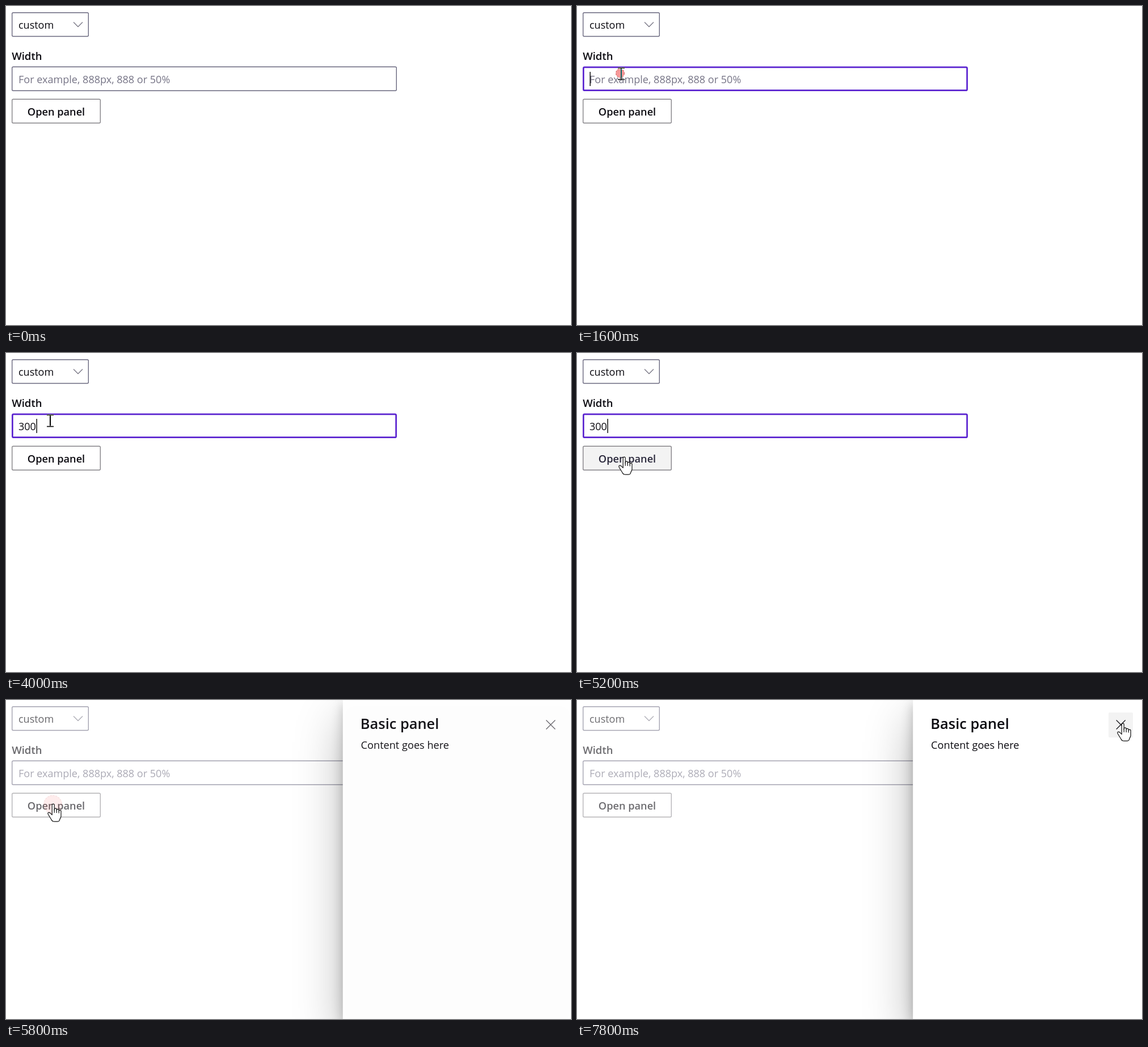
An HTML page with a canvas that plays this animation: 996x562 px, repeating every 8000 ms.

```html
<!DOCTYPE html>
<html lang="en">
<head>
<meta charset="utf-8">
<title>Panel with custom width</title>
<style>
  html, body { margin: 0; width: 100%; height: 100%; overflow: hidden; background: #fff; }
  canvas { display: block; width: 996px; height: 562px; }
</style>
</head>
<body>
<canvas id="stage" width="996" height="562"></canvas>
<script>
const ctx = document.getElementById('stage').getContext('2d');
const W = 996, H = 562, LOOP = 8000, STEP = 200;
const FONT = '"Open Sans", "Noto Sans", sans-serif';
const INK = '#0b0a10', BORDER = '#69677e', HINT = '#767486', ACCENT = '#5b24d0';

const INPUT = { x: 10, y: 106.5, w: 679, h: 43.5 };
const BUTTON = { x: 10, y: 163.5, w: 157, h: 43.5 };
const CLOSE = { x: 937, y: 22, w: 43, h: 44 };
const PANEL_X = 592.3, OPEN_AT = 5630, BLUR_AT = 5600;

const ARROW = new Path2D('M0 0V22.5l5-4.8 3.6 8 3.6-1.6-3.5-7.8h7z');
const HAND = new Path2D('M-.8 2.2a2 2 0 0 1 4 0V11v-1.5a2 2 0 0 1 4 .6v1a2 2 0 0 1 4 .6v1' +
  'a1.9 1.9 0 0 1 3.8 .6v8.5c0 2.5-2.5 4.5-2.5 6.8q-1 2.6-4 2.6h-5q-4 0-5.5-3.5' +
  'l-5.5-9q-1.5-3 .5-3.6 2-.4 4 2l2.2 2.2z');
const KNUCKLES = new Path2D('M3.2 9.5v6.2M7.2 11v5M11.2 12.5v4');

// Pointer path: time, x, y
const PATH = [
  [600, 200, 384], [800, 118, 222], [1000, 94.7, 154], [1200, 86, 134], [1400, 78, 119.5],
  [4800, 78, 119.5], [5000, 82, 157], [5200, 82, 183]
];
const CLICKS = [
  { at: 1600, x: 76, y: 118.5 },
  { at: 5557, x: 82.5, y: 184 }
];
const KEYS = [[3400, '3'], [3800, '30'], [4000, '300'], [5800, '']];

const inside = (p, r) => p.x >= r.x && p.x <= r.x + r.w && p.y >= r.y && p.y <= r.y + r.h;

function text(str, x, y, size, color, weight = 400, align = 'left') {
  ctx.font = `${weight} ${size}px ${FONT}`;
  ctx.fillStyle = color;
  ctx.textAlign = align;
  ctx.fillText(str, x, y);
}

function box(r, line, color, fill) {
  ctx.beginPath();
  ctx.roundRect(r.x + line / 2, r.y + line / 2, r.w - line, r.h - line, 2);
  ctx.fillStyle = fill || '#fff';
  ctx.fill();
  ctx.strokeStyle = color;
  ctx.lineWidth = line;
  ctx.stroke();
}

function stroke(color, width, ...lines) {
  ctx.strokeStyle = color;
  ctx.lineWidth = width;
  ctx.beginPath();
  for (const line of lines) {
    line.forEach(([x, y], i) => i ? ctx.lineTo(x, y) : ctx.moveTo(x, y));
  }
  ctx.stroke();
}

function pointer(t) {
  const last = PATH[PATH.length - 1];
  if (t >= last[0]) {
    const k = Math.min(1, Math.max(0, (t - 6900) / 900));
    const e = k * k * (3 - 2 * k);
    return { x: last[1] + 879 * e, y: last[2] - 142 * e };
  }
  const i = PATH.findIndex(p => p[0] > t);
  const [t0, x0, y0] = PATH[i - 1], [t1, x1, y1] = PATH[i];
  const k = (t - t0) / (t1 - t0);
  return { x: x0 + (x1 - x0) * k, y: y0 + (y1 - y0) * k };
}

function typed(t) {
  let value = '', since = 1540;
  for (const [at, str] of KEYS) {
    if (t >= at) { value = str; since = at; }
  }
  return { value, caret: Math.floor((t - since) / 530) % 2 === 0 };
}

function drawForm(t, overButton) {
  box({ x: 10, y: 11, w: 136, h: 43.2 }, 1.4, BORDER);
  text('custom', 22, 40, 18.05, INK);
  stroke('#7a7886', 1.3, [[119, 28.5], [127, 36.5], [135, 28.5]]);
  text('Width', 10.2, 95, 18.5, INK, 600);

  const focused = t >= 1600 && t < BLUR_AT;
  const { value, caret } = typed(t);
  box(INPUT, focused ? 2.7 : 1.4, focused ? ACCENT : BORDER);
  if (value) text(value, 22, 136.3, 18.05, INK);
  else text('For example, 888px, 888 or 50%', 22, 136.3, 18.05, HINT);
  if (focused && caret) {
    ctx.fillStyle = '#000';
    ctx.fillRect(22.5 + ctx.measureText(value).width, 116, 1.4, 25);
  }

  box(BUTTON, 1.4, '#858388', overButton ? '#f3f3f3' : '#fff');
  text('Open panel', 88.5, 193, 18.2, overButton ? '#29273a' : INK, 600, 'center');
}

function drawPanel(t, overClose) {
  if (t < OPEN_AT) return;
  const rest = Math.exp((OPEN_AT - t) / 52);
  ctx.save();
  ctx.globalAlpha = 1 - rest;
  ctx.fillStyle = 'rgba(255,255,255,.4)';
  ctx.fillRect(0, 0, W, H);

  ctx.translate(40 * rest, 0);
  ctx.fillStyle = '#fff';
  for (const [dy, blur, a] of [[35, 78, .3], [6.5, 19.6, .24]]) {
    ctx.shadowColor = `rgba(0,0,0,${a})`;
    ctx.shadowBlur = blur;
    ctx.shadowOffsetY = dy;
    ctx.fillRect(PANEL_X, 0, W - PANEL_X, H);
  }
  ctx.shadowColor = 'transparent';

  text('Basic panel', PANEL_X + 31, 51, 25.4, INK, 600);
  text('Content goes here', PANEL_X + 31.8, 86, 18.15, INK);
  if (overClose) {
    ctx.fillStyle = '#f3f3f3';
    ctx.beginPath();
    ctx.roundRect(CLOSE.x, CLOSE.y, CLOSE.w, CLOSE.h, 2);
    ctx.fill();
  }
  stroke(overClose ? '#201f24' : '#66646a', 1.4,
    [[950.7, 35.5], [966.7, 51.5]], [[966.7, 35.5], [950.7, 51.5]]);
  ctx.restore();
}

function drawClick(t, { at, x, y }) {
  const r = 7.5 + (t - at) * .035;
  if (t < at || r > 17) return;
  ctx.save();
  ctx.globalAlpha = Math.max(0, .52 - (r - 7.5) * .05);
  ctx.fillStyle = '#f03c3c';
  ctx.strokeStyle = '#b01c1c';
  ctx.lineWidth = 1.2;
  ctx.setLineDash([3, 2]);
  ctx.beginPath();
  ctx.arc(x, y, r, 0, 7);
  ctx.fill();
  ctx.stroke();
  ctx.restore();
}

function drawBeam() {
  ctx.globalCompositeOperation = 'difference';
  ctx.fillStyle = '#fff';
  ctx.fillRect(-6, -11, 12, 1.6);
  ctx.fillRect(-1, -9.4, 2, 18.6);
  ctx.fillRect(-6, 9.2, 12, 1.6);
}

function drawShape(path, detail) {
  ctx.fillStyle = '#fff';
  ctx.strokeStyle = '#111';
  ctx.lineWidth = 1.2;
  ctx.lineJoin = 'round';
  ctx.fill(path);
  ctx.stroke(path);
  if (detail) ctx.stroke(detail);
}

function drawCursor(p, kind) {
  ctx.save();
  ctx.translate(p.x, p.y);
  if (kind === 'beam') drawBeam();
  else if (kind === 'hand') drawShape(HAND, KNUCKLES);
  else drawShape(ARROW);
  ctx.restore();
}

function draw(t) {
  ctx.fillStyle = '#fff';
  ctx.fillRect(0, 0, W, H);

  const shown = t >= PATH[0][0];
  const p = shown ? pointer(t) : { x: -99, y: -99 };
  const open = t >= OPEN_AT;
  const overButton = !open && inside(p, BUTTON);
  const overClose = open && inside(p, CLOSE);
  const resting = open && t < 7000;
  const hand = overButton || overClose || resting;

  drawForm(t, overButton);
  drawPanel(t, overClose);
  CLICKS.forEach(c => drawClick(t, c));
  if (shown) drawCursor(p, hand ? 'hand' : !open && inside(p, INPUT) ? 'beam' : 'arrow');
}

const start = performance.now();
function tick() {
  const t = (performance.now() - start) % LOOP;
  draw(Math.floor(t / STEP) * STEP);
  requestAnimationFrame(tick);
}
tick();
</script>
</body>
</html>
```
